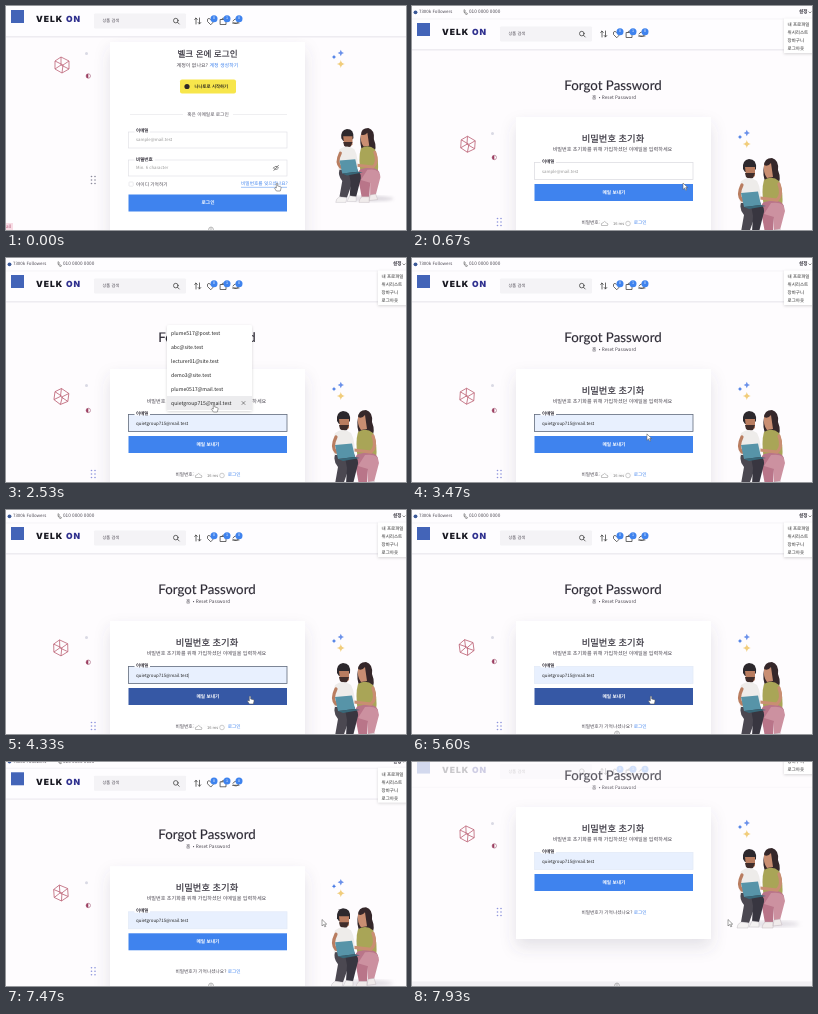
Animation of 400x224 px, one loop 8000 ms. Source, as an HTML page:

```html
<!DOCTYPE html>
<html lang="ko">
<head>
<meta charset="utf-8">
<title>비밀번호 초기화</title>
<style>
html, body { margin: 0; width: 100%; height: 100%; overflow: hidden; background: #fefcfe; }
svg { display: block; width: 100vw; height: 100vh; }
text { font: 4.7px 'Noto Sans CJK KR', 'Noto Sans CJK', 'Noto Sans', sans-serif; fill: #4a4650; dominant-baseline: central; text-rendering: geometricPrecision; white-space: pre; }
.mid { text-anchor: middle; }
.medium { fill: #2d2a35; stroke: #2d2a35; stroke-width: .15; }
.pale { fill: #999; }
.blue { fill: #3f83ee; }
.line { fill: none; stroke: #444; stroke-width: .8; stroke-linecap: round; stroke-linejoin: round; }
</style>
</head>
<body>
<svg viewBox="0 0 400 224" preserveAspectRatio="none">
  <defs>
    <filter id="shadow" x="-25%" y="-25%" width="150%" height="160%">
      <feDropShadow dx="0" dy="8" stdDeviation="8" flood-color="#556" flood-opacity=".15"/>
    </filter>
    <filter id="popupShadow" x="-20%" y="-20%" width="140%" height="140%">
      <feDropShadow dx="0" dy="1" stdDeviation="1.5" flood-color="#000" flood-opacity=".16"/>
    </filter>
    <filter id="soft"><feGaussianBlur stdDeviation="2"/></filter>
    <path id="star" d="M0-4Q.5-.5 4 0Q.5.5 0 4Q-.5.5-4 0Q-.5-.5 0-4Z"/>
    <g id="cube" fill="none" stroke="#bd6376" stroke-width=".8" stroke-linejoin="round">
      <path d="M-1-8L7-4L7 4L0 8L-7 4L-7-4ZM-7-4L1 0L7-4M1 0L0 8M-1-8L-1 0L-7 4M-1 0L7 4"/>
    </g>
    <g id="couple">
      <ellipse cx="362" cy="162" rx="25" ry="3" fill="#c9c4cd" opacity=".6" filter="url(#soft)"/>
      <!-- woman -->
      <path d="M352 94Q352 86 360 86Q367 88 366 98Q370 108 365 114L354 112Q350 102 352 94Z" fill="#35272a"/>
      <path d="M352 93Q356 95 359 91L361 105L355 106Q351 101 352 93Z" fill="#c98e72"/>
      <path d="M352 108Q360 103 367 109Q372 120 370 136L352 136Q349 118 352 108Z" fill="#a9a557"/>
      <path d="M352 130Q369 126 372 134Q372 142 362 145L361 161L353 161L349 139Q348 133 352 130Z" fill="#b97589"/>
      <path d="M359 131Q373 129 373 139L368 158L362 159L362 145L352 142Z" fill="#cc91a0"/>
      <path d="M367 112Q371 123 365 128L348 126" fill="none" stroke="#c98e72" stroke-width="3.200" stroke-linecap="round"/>
      <path d="M353 160H361L361 166H350Q350 163 353 160ZM362 158L368 157L370 163L361 164Z" fill="#f0ebeb" stroke="#b9adb3" stroke-width=".4"/>
      <!-- man -->
      <path d="M331 97Q330 88 337 87Q345 87 344 97L341 100L333 100Z" fill="#2c282d"/>
      <path d="M333 95L343 95L343 104Q339 108 334 104Z" fill="#b97d60"/>
      <path d="M333 101L343 101L341 106Q337 108 334 105Z" fill="#3f2d2b"/>
      <path d="M329 109Q337 103 345 109Q350 118 348 133L329 136Q325 120 329 109Z" fill="#eeecea"/>
      <path d="M329 131L348 130Q352 136 344 141L337 161L329 160L332 143Q327 137 329 131Z" fill="#4b4851"/>
      <path d="M339 133Q353 130 352 140L347 160L340 160L341 144Z" fill="#383640"/>
      <path d="M330 113Q325 123 330 128L339 130" fill="none" stroke="#b97d60" stroke-width="3.200" stroke-linecap="round"/>
      <path d="M329 121L346 119.500L349 133L332 135Z" fill="#5794a8"/>
      <path d="M332 135L349 133L354 134L337 137Z" fill="#386879"/>
      <path d="M329 160L337 161L336 166H325Q325 162 329 160ZM340 159L347 160L347 165H337Z" fill="#f4f2f2" stroke="#b7b1b8" stroke-width=".4"/>
    </g>
    <g id="stars">
      <use href="#star" transform="translate(334.800 127) scale(.8)" fill="#6b91ea"/>
      <use href="#star" transform="translate(328 131) scale(.55)" fill="#4679e5"/>
      <use href="#star" transform="translate(334.800 138)" fill="#f1cd7c"/>
      <circle cx="80.500" cy="127.500" r="1.500" fill="#d9d9e4"/>
    </g>
    <g id="dots"></g>
  </defs>

  <g id="login">
    <rect x="104" y="36" width="195" height="225" fill="#fff" filter="url(#shadow)"/>
    <text class="mid medium" x="201.500" y="47.500" style="font-size:8.600px">벨크 온에 로그인</text>
    <text class="mid" x="201.500" y="59" style="font-size:5px">계정이 없나요? <tspan class="blue">계정 생성하기</tspan></text>
    <rect x="174" y="73.500" width="56" height="14" rx="2" fill="#f7e64b"/>
    <circle cx="181" cy="80.500" r="2.600" fill="#2d2826"/>
    <text x="188.500" y="80.700" style="font-size:4.400px;font-weight:700;fill:#332f20">나나토로 시작하기</text>
    <path d="M124 108.500H177M227 108.500H281" stroke="#e4e4e8" stroke-width=".6"/>
    <text class="mid" x="202" y="108.500">혹은 이메일로 로그인</text>
    <g fill="#fff" stroke="#dedee3" stroke-width=".6">
      <rect x="122.500" y="126" width="158.500" height="16"/>
      <rect x="122.500" y="154" width="158.500" height="16"/>
      <rect x="123" y="176" width="4.200" height="4.200" rx=".6"/>
    </g>
    <path d="M128.500 126H144M128.500 154H149" stroke="#fff" stroke-width="1.500"/>
    <text class="medium" x="130" y="125.300" style="font-size:4.500px">이메일</text>
    <text class="medium" x="130" y="153.500" style="font-size:4.500px">비밀번호</text>
    <text class="pale" x="130" y="134" style="font-size:4.300px">sample@mail.test</text>
    <text class="pale" x="130" y="162" style="font-size:4.300px">Min. 6 character</text>
    <path class="line" style="stroke-width:.6" d="M267.500 162Q270 158.500 272.500 162Q270 165 267.500 162M267.800 164.500L272.500 159.300"/>
    <text x="130" y="178.500">아이디 기억하기</text>
    <text class="blue" x="235" y="178">비밀번호를 잊으셨나요?</text>
    <path d="M235 181.300H281" stroke="#3f83ee" stroke-width=".5"/>
    <rect x="122.500" y="188.500" width="158.500" height="17" fill="#3f83ee"/>
    <text class="mid" x="202" y="197" style="font-weight:700;fill:#fff">로그인</text>
    <use href="#stars" y="-80"/>
    <use href="#dots" y="-42" fill="#889"/>
    <use href="#couple" transform="translate(27.500 42) scale(.93)"/>
    <rect y="217" width="7" height="7" fill="#f8dce5"/>
    <text x="0" y="221" style="font-size:4.500px;fill:#b65c78">all</text>
  </g>

  <g id="reset">
    <rect y="285.500" width="400" height="20" fill="#f2f0f4"/>
    <rect x="104" y="111" width="195" height="132" fill="#fff" filter="url(#shadow)"/>
    <text class="mid medium" x="201" y="79" style="font:13.300px Lato,sans-serif">Forgot Password</text>
    <text class="mid" x="202" y="92">홈  • Reset Password</text>
    <text class="mid medium" x="201" y="132" style="font-size:9.300px">비밀번호 초기화</text>
    <text class="mid" x="200.500" y="143" style="font-size:5.100px">비밀번호 초기화를 위해 가입하셨던 이메일을 입력하세요</text>
    <rect id="field" x="122.500" y="156.500" width="158.500" height="17" stroke-width=".8"/>
    <path d="M128.500 156.500H144" stroke="#fff" stroke-width="1.800"/>
    <text class="medium" x="130" y="156" style="font-size:4.500px">이메일</text>
    <text id="value" x="130" y="165.500"></text>
    <rect id="submit" x="122.500" y="178" width="158.500" height="17"/>
    <text class="mid" x="202" y="186.500" style="font-weight:700;fill:#fff">메일 보내기</text>
    <text class="mid" x="202" y="217">비밀번호가 기억나셨나요? <tspan class="blue">로그인</tspan></text>
    <use href="#stars"/>
    <use href="#dots" fill="#8c94dc"/>
    <use href="#couple" y="66"/>
  </g>

  <g id="spinCube"><use href="#cube"/></g>
  <g id="ring"><circle r="2.200" fill="#fff" stroke="#b98399" stroke-width=".8"/><path d="M0-2.200A2.200 2.200 0 0 0 0 2.200Z" fill="#9b3d60"/></g>

  <g id="header">
    <rect width="400" height="30.500" y="13" fill="#fefdff"/>
    <path d="M0 43.800H400" stroke="#eeecf1" stroke-width="1.400"/>
    <rect x="5" y="17" width="13" height="13" fill="#4364b8"/>
    <text x="30" y="27.300" style="font:900 8.500px Inter,sans-serif;letter-spacing:1px;fill:#171720">VELK <tspan fill="#30318f">ON</tspan></text>
    <rect x="88" y="20.500" width="92" height="15" rx="1" fill="#f4f3f6"/>
    <text x="96.500" y="28" style="font-size:4.200px" fill="#777">상품 검색</text>
    <circle class="line" cx="169.800" cy="27.600" r="2.300"/><path class="line" d="M171.500 29.300L173.200 31"/>
    <path class="line" d="M190 31V25L188.700 26.500M190 25L191.300 26.500M193.500 25V31L192.200 29.500M193.500 31L194.800 29.500"/>
    <path class="line" d="M204.500 31.500L201.500 28.500Q200.800 25.500 203 25.300L204.500 26.600L206 25.300Q208.200 25.500 207.500 28.500Z"/>
    <path class="line" d="M214.500 26.500H220V31.500H214.500ZM215.800 26.500Q217.200 23 218.600 26.500"/>
    <path class="line" d="M227 28Q229 24.500 232 27M233 28.500Q231 32 227.500 30M226.500 30H233"/>
    <g id="badges"></g>
  </g>

  <g id="topbar">
    <rect width="400" height="13" fill="#fefdff"/>
    <path d="M0 13H400" stroke="#ececf1" stroke-width=".6"/>
    <circle cx="3.500" cy="6.300" r="1.900" fill="#3b5998"/>
    <text x="7" y="6.300" style="font-size:4.400px">7300k Followers</text>
    <path class="line" d="M52 4Q51.500 8 55 8.500L55.500 7.500L54.200 6.800L53.500 7.200L52.700 6L53.200 5Z" style="stroke-width:.5"/>
    <text x="57" y="6.300">010 0000 0000</text>
    <text class="medium" x="387" y="6.300">설정</text>
    <path class="line" d="M396.800 5.800L398 7L399.200 5.800" style="stroke-width:.6"/>
  </g>
  <g id="menu"><rect x="372" y="12.500" width="30" height="34.500" fill="#fff" filter="url(#popupShadow)"/></g>

  <g id="popup">
    <rect x="161" y="67" width="85" height="86" rx="2" fill="#fff" filter="url(#popupShadow)"/>
    <rect id="choice" x="161" y="138" width="85" height="14" fill="#ececee"/>
    <path class="line" d="M236 143.500L239 146.500M239 143.500L236 146.500" style="stroke-width:.6"/>
  </g>

  <g id="toast">
    <rect x="187.500" y="210" width="33.500" height="13" rx="2" fill="#fff" opacity=".96"/>
    <path d="M189.500 219.500Q188.500 217 191 216.800Q192.500 214 194.500 217Q197 217.500 195.500 219.500Z" fill="none" stroke="#999" stroke-width=".6"/>
    <text x="201" y="218" style="font-size:4px;fill:#777">16 ms</text>
    <circle cx="216" cy="217.500" r="2.300" fill="none" stroke="#aaa" stroke-width=".6"/>
  </g>
  <path id="bottomMark" class="line" d="M202.500 224Q202.500 221 205 221Q207.500 221 207.500 224M205 222V224" style="stroke:#888;stroke-width:.6"/>

  <g id="cursor" stroke="#555" stroke-width=".55" stroke-linejoin="round">
    <path id="arrow" fill="#fff" d="M0 0V6.500L1.600 5L2.800 7.400L3.800 6.900L2.700 4.600H4.700Z"/>
    <path id="hand" fill="#fff" d="M-.7.600Q0-.6.700.600V3L3.500 3.700Q4.200 4 4 5.200L3.300 8H-.6L-2.500 5.200Q-2.300 4-.7 5Z"/>
    <path id="beam" fill="none" d="M-1-3H1M0-3V3M-1 3H1"/>
  </g>
</svg>
<script>
const LOOP = 8000, PAGE = 400, OPEN = 1500, HOVER = 2150, PICK = 2750, SUBMIT = 5000;
const email = 'quietgroup715@mail.test';
const suggestions = ['plume517@post.test', 'abc@site.test', 'lecturer01@site.test',
  'demo3@site.test', 'plume0517@mail.test', email];
// time, x, y of the pointer tip
const pointerPath = [[0, 271, 177], [900, 271, 177], [1400, 213, 165], [1700, 213, 165],
  [2250, 208, 146], [2900, 208, 146], [3750, 244, 186], [4400, 244, 186], [4900, 239, 186],
  [6000, 239, 186], [6900, 316, 157.5], [LOOP, 316, 157.5]];

const $ = id => document.getElementById(id);
const clamp = v => Math.max(0, Math.min(1, v));
const smooth = v => { v = clamp(v); return v * v * (3 - 2 * v); };
const show = (id, on) => $(id).style.display = on ? '' : 'none';
const move = (id, x, y, extra = '') => $(id).setAttribute('transform', `translate(${x} ${y})${extra}`);
const add = (id, markup) => $(id).insertAdjacentHTML('beforeend', markup);

['내 프로파일', '위시리스트', '장바구니', '로그아웃'].forEach((label, i) =>
  add('menu', `<text x="375.5" y="${19.3 + i * 8}" style="font-size:4.5px;fill:#222">${label}</text>`));
suggestions.forEach((label, i) =>
  add('popup', `<text x="165" y="${75.5 + i * 13.9}" style="font-size:5.1px;fill:#222">${label}</text>`));
[208, 221, 233].forEach((x, i) =>
  add('badges', `<circle cx="${x}" cy="25.8" r="3.5" fill="#3f83ee"/><text class="mid" x="${x}" y="25.8" style="font-size:3.6px;fill:#fff">${i === 1 ? 1 : 0}</text>`));
for (let i = 0; i < 6; i++)
  add('dots', `<circle cx="${85.5 + i % 2 * 3.5}" cy="${212.5 + (i >> 1) * 3.5}" r=".8"/>`);

function pointerAt(t) {
  const i = pointerPath.findIndex(p => p[0] > t);
  const [t0, x0, y0] = pointerPath[i - 1], [t1, x1, y1] = pointerPath[i];
  const k = smooth((t - t0) / (t1 - t0));
  return [x0 + (x1 - x0) * k, y0 + (y1 - y0) * k];
}

function drawField(t) {
  const filled = t >= HOVER, focused = t >= OPEN && t < SUBMIT;
  const caret = focused && (t < HOVER || t > PICK) && (t - PICK + 2120) % 1060 < 530;
  $('field').setAttribute('fill', filled ? '#e8f0fe' : '#fff');
  $('field').setAttribute('stroke', focused ? '#626b7d' : filled ? '#e4ebf8' : '#dedee3');
  const value = $('value');
  value.textContent = (filled ? email : focused ? '' : 'sample@mail.test') + (caret ? '|' : '');
  value.style.fontSize = filled ? '4.4px' : '4.3px';
  value.style.fill = focused || filled ? '#222' : '#999';
}

function draw(t) {
  const login = t < PAGE;
  const scroll = 66 * smooth((t - 7358) / 572);
  const scrolledPast = scroll > 45;
  const sticky = login || scrolledPast;
  const reveal = login ? 1 : clamp((t - 7730) / 900);

  show('login', login);
  show('reset', !login);
  show('topbar', !sticky);
  show('menu', !login);
  move('reset', 0, -scroll);
  move('topbar', 0, -scroll);
  move('menu', 0, scrolledPast ? -35 : -scroll);
  move('header', 0, sticky ? -13 - 7 * (1 - reveal) : -scroll);
  $('header').setAttribute('opacity', sticky ? reveal : 1);

  const drift = Math.sin(t / 1300);
  const shapesY = login ? -79 : -scroll;
  move('spinCube', 55.3 + .7 * Math.cos(t / 1800), 138 + .6 * drift + shapesY, ` rotate(${8 * drift})`);
  move('ring', 82.3, 151 + 1.5 * Math.sin(t / 2000) + shapesY - (login ? 2 : 0));

  const [x, y] = pointerAt(t);
  const overButton = !login && x < 281 && y > 178 && y < 195;
  const overChoice = t >= HOVER && t < PICK;
  const overField = !login && !overChoice && x < 281 && y > 156.5 && y < 173.5;
  drawField(t);
  $('submit').setAttribute('fill', overButton ? '#3658a5' : '#3f83ee');
  show('popup', t >= OPEN && t < PICK);
  show('choice', overChoice);
  show('toast', !login && t < SUBMIT);
  show('bottomMark', login || t >= SUBMIT);

  const hand = login || overButton || overChoice;
  move('cursor', x, y);
  show('hand', hand);
  show('beam', !hand && overField);
  show('arrow', !hand && !overField);
}

function tick() {
  draw(performance.now() % LOOP);
  requestAnimationFrame(tick);
}
tick();
</script>
</body>
</html>
```
